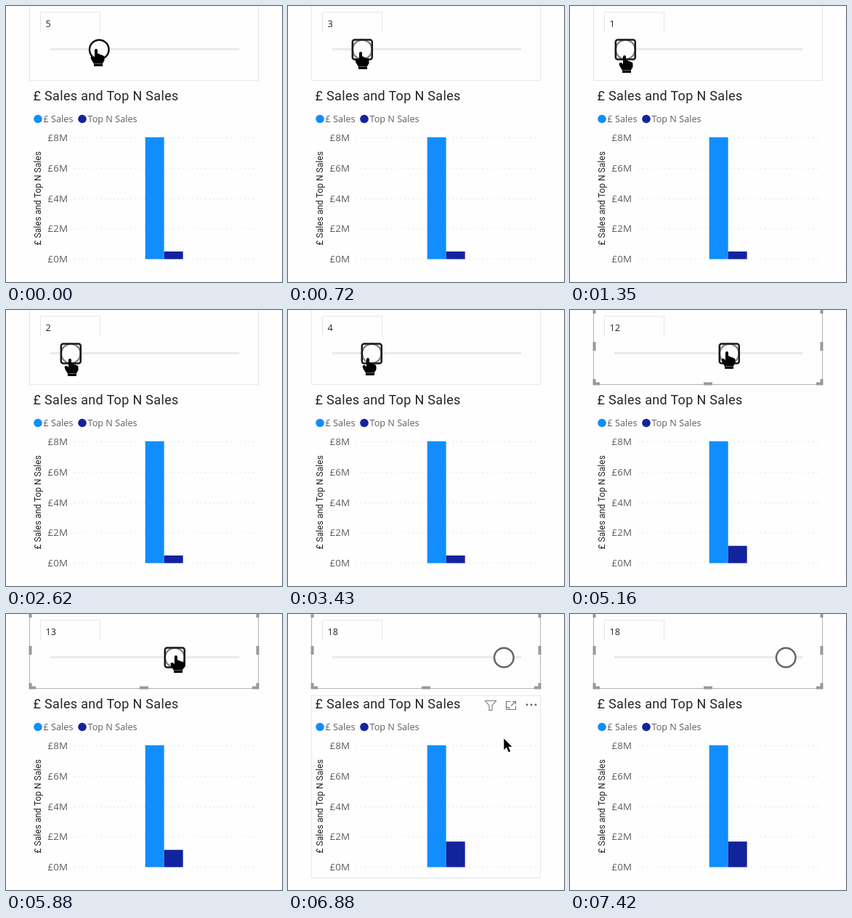
Write an HTML page that moves like this. It is 380 px wide and 380 px high and loops after 8.26 s.

```html
<!DOCTYPE html>
<html lang="en">
<head>
<meta charset="utf-8">
<title>Top N slider</title>
<style>
  html, body { margin: 0; width: 100%; height: 100%; overflow: hidden; background: #fefefe; }
  svg { display: block; width: 380px; height: 380px; }
  .din { font-family: Roboto, sans-serif; fill: #252423; }
  .ui { font: 12.7px "Open Sans", sans-serif; fill: #605e5c; }
  .ui.axis { font-size: 13.4px; text-anchor: end; }
  .line { fill: none; stroke: #e6e6e6; }
  .grid { stroke: #d4d4d4; stroke-dasharray: 1 5; }
  .icon { fill: none; stroke: #777; stroke-width: 1.1; }
</style>
</head>
<body>
<svg viewBox="0 0 380 380">
  <!-- slicer -->
  <path class="line" d="M32.5 0V102.5H347.5V0"/>
  <path class="line" d="M47.5 37V8.5H129.5V37"/>
  <text class="ui" id="value" x="54.5" y="28.5" style="fill:#252423"></text>
  <rect x="61" y="58" width="260" height="3" fill="#eaeaea"/>
  <g id="thumb">
    <circle id="ring" r="13.3" fill="#fefefe" stroke-width="2.5"/>
    <rect id="focus" x="-13.5" y="-13.5" width="27" height="27" rx="3" fill="none" stroke="#1a1a1a" stroke-width="2.5"/>
  </g>
  <g id="selection">
    <path d="M32.5 0V102.5H347.5V0" fill="none" stroke="#b3b3b3"/>
    <path d="M33.5 0V5M33.5 44V56M33.5 95V101.5H41M184 101.5H196M339 101.5H346.5V95M346.5 56V44M346.5 5V0"
      fill="none" stroke="#999" stroke-width="4"/>
  </g>

  <!-- chart -->
  <text class="din" x="37.5" y="130" font-size="18" letter-spacing=".32">£ Sales and Top N Sales</text>
  <circle cx="44" cy="155.5" r="5.8" fill="#118dff"/>
  <text class="ui" x="51.5" y="160">£ Sales</text>
  <circle cx="105" cy="155.5" r="5.8" fill="#12239e"/>
  <text class="ui" x="112.5" y="160">Top N Sales</text>
  <text class="din" transform="translate(48 329.5) rotate(-90)" font-size="12" letter-spacing=".04">£ Sales and Top N Sales</text>
  <g id="axis"></g>
  <rect x="191.7" y="180.7" width="26" height="167.8" fill="#118dff"/>
  <rect id="bar" x="217.7" width="26" fill="#12239e"/>
  <g id="hover">
    <rect class="line" x="32.5" y="112.5" width="315" height="251"/>
    <path class="icon" d="M271.5 119.5H286.5L281 126V132.5H277V126Z"/>
    <path class="icon" d="M307 120.5H300.5V131.5H313.5V127M309 120.5H313.5V124.5M313.5 120.5L307 126.5M300.5 128.5H304.5V131.5"/>
    <path d="M329 125h0m6 0h0m6 0h0" stroke="#666" stroke-width="2.8" stroke-linecap="round"/>
  </g>

  <!-- pointers, tip at 0,0 -->
  <g id="hand">
    <path d="M-2 2Q-2 0 0 0T2 2V6.500Q5 6 5.500 8Q8 7.500 8.500 9Q11.500 9 11.500 12V16L9 20V24H-3V20.500L-6.500 15L-7.500 11.500Q-6 8.500-3 11L-2 12Z"/>
    <path d="M-2 20.500H8.500" stroke="#aaa" stroke-width=".6"/>
  </g>
  <path id="arrow" d="M0 0V16.500L3.800 13L6.500 19.500L9.500 18.200L6.800 12H12Z" stroke="#fff" stroke-width=".6"/>
</svg>
<script>
  const LOOP = 8260, TICK = 90;
  const GRAB = 270, RELEASE = 3890, REGRAB = 4710, LEAVE = 6330, EXIT = 7420;
  const commits = [0, 4070, 5070, 6420];
  const el = id => document.getElementById(id);

  // pointer path: time, x, y
  const path = [
    [0, 124, 59], [180, 123, 59], [1080, 84, 66], [1350, 75, 68], [2260, 75, 68],
    [2440, 86, 67], [2530, 86, 67], [3420, 110, 66], [4350, 114, 66], [4590, 134, 62],
    [4770, 205, 58], [5220, 219, 57], [5850, 234, 57], [6210, 297, 92],
    [6570, 300, 150], [6840, 297, 171], [7290, 300, 354]
  ];

  const show = (id, on) => el(id).style.display = on ? "" : "none";
  const place = (id, x, y) => el(id).setAttribute("transform", `translate(${x} ${y})`);

  function pointer(time) {
    const t = Math.floor(time / TICK) * TICK;
    const i = path.findIndex(point => point[0] > t);
    if (i < 0) return path[path.length - 1].slice(1);
    const [t0, x0, y0] = path[i - 1], [t1, x1, y1] = path[i];
    const k = (t - t0) / (t1 - t0);
    return [Math.round(x0 + (x1 - x0) * k), Math.round(y0 + (y1 - y0) * k)];
  }

  // The thumb snaps to the whole number nearest the dragging pointer
  function sliderValue(t) {
    const dragTime = t < REGRAB ? Math.min(t, RELEASE) : Math.min(t, LEAVE - TICK);
    return Math.round((pointer(dragTime)[0] - 63) / 13);
  }

  function draw(t) {
    const value = sliderValue(t);
    const committed = sliderValue(commits.filter(c => c <= t).pop());
    const height = 1 + 1.9 * committed;
    const [x, y] = pointer(t);
    const focused = t >= GRAB && t < LEAVE + TICK;

    el("value").textContent = value;
    place("thumb", 63.3 + 13 * value, 60);
    show("focus", focused);
    el("ring").setAttribute("stroke", focused ? "#858585" : t < GRAB ? "#111" : "#666");
    el("bar").setAttribute("y", 348.5 - height);
    el("bar").setAttribute("height", height);
    show("selection", t >= RELEASE + TICK);
    show("hover", t >= LEAVE + TICK && t < EXIT);
    show("hand", t < LEAVE);
    show("arrow", t >= LEAVE && t < EXIT);
    place("hand", x, y);
    place("arrow", x, y);
  }

  el("axis").innerHTML = [8, 6, 4, 2, 0].map((m, i) => {
    const y = Math.round(181 + i * 41.8) + .5;
    return `<path class="grid" d="M94 ${y}H342"/><text class="ui axis" x="85" y="${y + 4.5}">£${m}M</text>`;
  }).join("");

  function frame() {
    draw(performance.now() % LOOP);
    requestAnimationFrame(frame);
  }
  frame();
</script>
</body>
</html>
```
